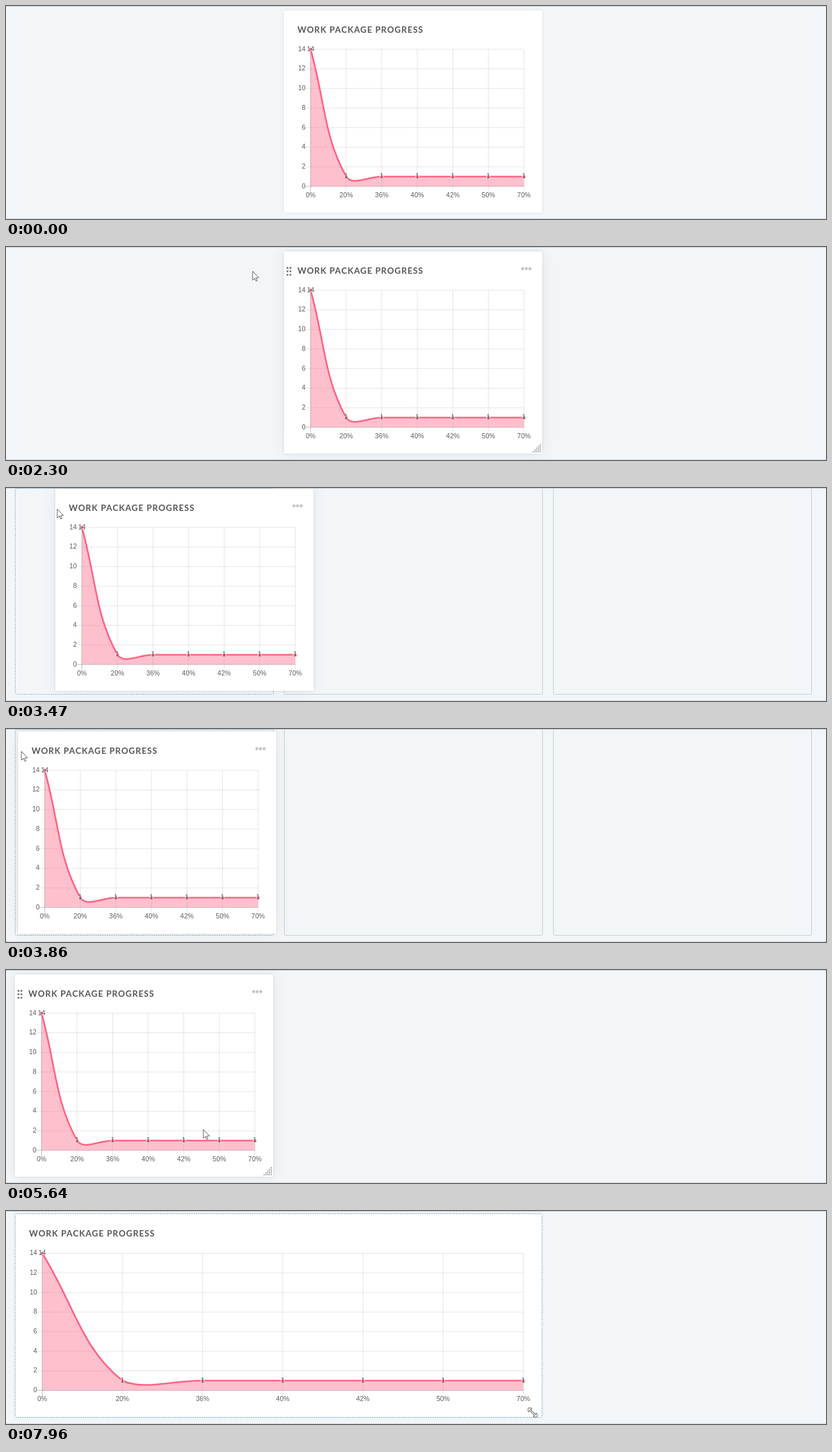
Write an HTML page with a canvas that moves like this. It is 1280 by 334 pixels and loops after 8000 ms.

```html
<!DOCTYPE html>
<html lang="en">
<head>
<meta charset="utf-8">
<title>Dashboard widget</title>
<style>
  html, body { margin: 0; width: 100%; height: 100%; overflow: hidden; background: #f2f6f9; }
  canvas { display: block; }
</style>
</head>
<body>
<canvas id="stage" width="1280" height="334"></canvas>
<script>
const ctx = document.getElementById('stage').getContext('2d');
const LOOP = 8000, STEP = 78;
const CARD_W = 403, CARD_H = 317, PITCH = 420, MARGIN = 14;
const PINK = '#ff6384';
const LABELS = ['0%', '20%', '36%', '40%', '42%', '50%', '70%'];
const VALUES = LABELS.map((_, i) => i ? 1 : 14);

const ENTER = 520, GRAB = 1440, LIFT = 2300, OVER_HANDLE = 4080;
const DROP = 4870, LEAVE = 5180, OVER_GRIP = 6180, RESIZE = 6890;

const linear = p => p;
const easeOut = p => 1 - (1 - p) ** 2;
const leg = (start, end, from, to, ease = linear) => ({ start, end, from, to, ease });

const POINTER = [
  leg(ENTER, GRAB, [655, 318], [440, 38]),
  leg(LIFT, 3080, [385, 38], [190, 46]),
  leg(3080, 3470, [190, 46], [80, 33]),
  leg(3470, OVER_HANDLE, [80, 33], [16, 35], easeOut),
  leg(LEAVE, 6130, [24, 68], [406, 313], easeOut),
  leg(RESIZE, 7680, [416, 315], [681, 306]),
  leg(7680, 7960, [681, 306], [822, 316])
];
const CARD = [
  leg(LIFT, 3080, [434, 7], [223, 19]),
  leg(3080, 3470, [223, 19], [77, 1]),
  leg(3470, OVER_HANDLE, [77, 1], [10, 4], easeOut),
  leg(DROP, LEAVE, [14, 7], [14, 7])
];

function along(legs, t) {
  const { start, end, from, to, ease } = legs.filter(l => l.start <= t).pop() || legs[0];
  const passed = t >= end - 8 ? end - start : Math.floor((t - start) / STEP + .1) * STEP;
  const p = ease(Math.min(1, Math.max(0, passed / (end - start))));
  return from.map((v, i) => Math.round(v + (to[i] - v) * p));
}

function line(x0, y0, x1, y1, color) {
  ctx.strokeStyle = color;
  ctx.lineWidth = 1;
  ctx.beginPath();
  ctx.moveTo(x0, y0);
  ctx.lineTo(x1, y1);
  ctx.stroke();
}

function dot(x, y, r, color) {
  ctx.fillStyle = color;
  ctx.beginPath();
  ctx.arc(x, y, r, 0, Math.PI * 2);
  ctx.fill();
}

function text(s, x, y, align) {
  ctx.font = '10.4px "Liberation Sans", Arial, sans-serif';
  ctx.textAlign = align;
  ctx.textBaseline = 'middle';
  ctx.fillStyle = '#5a5a5a';
  ctx.fillText(s, x, y);
}

function outline(x, y, w, h, color, dash = []) {
  ctx.setLineDash(dash);
  ctx.strokeStyle = color;
  ctx.lineWidth = 1;
  ctx.beginPath();
  ctx.roundRect(x + .5, y + .5, w - 1, h - 1, 2);
  ctx.stroke();
  ctx.setLineDash([]);
}

const dashed = (x, y, w, h) => outline(x, y, w, h, '#79a9c9', [1.75, 1.75]);

function shadow(alpha, blur) {
  ctx.shadowColor = `rgba(0,0,0,${alpha})`;
  ctx.shadowBlur = blur;
  ctx.fill();
}

function panel(x, y, w, h, raised) {
  ctx.save();
  ctx.fillStyle = '#fff';
  ctx.beginPath();
  ctx.roundRect(x, y, w, h, 2);
  if (raised) shadow(.06, 26);
  shadow(.1, 4);
  ctx.restore();
}

// Smooth line through the points, handles kept inside the plot.
function curve(pts, top, bottom) {
  const clamp = y => Math.min(bottom, Math.max(top, y));
  const handles = pts.map((p, i) => {
    const a = pts[i - 1] || p, b = pts[i + 1] || p;
    const da = Math.hypot(p[0] - a[0], p[1] - a[1]);
    const db = Math.hypot(b[0] - p[0], b[1] - p[1]);
    const ka = .4 * da / (da + db), kb = .4 * db / (da + db);
    const dx = b[0] - a[0], dy = b[1] - a[1];
    return [p[0] - ka * dx, clamp(p[1] - ka * dy), p[0] + kb * dx, clamp(p[1] + kb * dy)];
  });
  ctx.beginPath();
  ctx.moveTo(...pts[0]);
  for (let i = 1; i < pts.length; i++) {
    const h0 = handles[i - 1], h1 = handles[i];
    ctx.bezierCurveTo(h0[2], h0[3], h1[0], h1[1], ...pts[i]);
  }
}

function chart(x, y, w) {
  const left = x + 41.5, right = x + w - 28.5, top = y + 60.8, bottom = y + 275.8;
  const gap = (right - left) / (VALUES.length - 1);
  const yOf = v => bottom - v * (bottom - top) / 14;
  const shade = i => i ? 'rgba(0,0,0,.1)' : 'rgba(0,0,0,.25)';

  LABELS.forEach((label, i) => {
    const px = left + gap * i;
    line(px, top, px, bottom + 8, shade(i));
    text(label, px, y + 290, 'center');
  });
  for (let v = 0; v <= 14; v += 2) {
    line(left - 8, yOf(v), right, yOf(v), shade(v));
    text(v, left - 8, yOf(v), 'right');
  }

  const pts = VALUES.map((v, i) => [left + gap * i, yOf(v)]);
  curve(pts, top, bottom);
  ctx.lineTo(right, bottom);
  ctx.lineTo(left, bottom);
  ctx.fillStyle = 'rgba(255,99,132,.4)';
  ctx.fill();
  curve(pts, top, bottom);
  ctx.strokeStyle = PINK;
  ctx.lineWidth = 2.6;
  ctx.stroke();

  pts.forEach(([px, py], i) => {
    dot(px, py, 3, '#fff');
    dot(px, py, 2.2, PINK);
    text(VALUES[i], px, py, 'center');
  });
}

function content(x, y, w) {
  ctx.font = 'bold 13.2px Lato, sans-serif';
  ctx.letterSpacing = '1px';
  ctx.textAlign = 'left';
  ctx.textBaseline = 'alphabetic';
  ctx.fillStyle = '#555';
  ctx.fillText('WORK PACKAGE PROGRESS', x + 21, y + 34.5);
  ctx.letterSpacing = '0px';
  chart(x, y, w);
}

function menu(x, y) {
  for (let i = 0; i < 3; i++) dot(x + 372.6 + i * 5.6, y + 27, 2.4, '#c6c6c6');
}

function handles(x, y) {
  for (let i = 0; i < 6; i++) {
    dot(x + 5.4 + (i % 2) * 4.6, y + 25.7 + (i >> 1) * 5.4, 1.6, '#757a82');
  }
  ctx.fillStyle = '#808488';
  for (let row = 0; row < 5; row++) {
    for (let col = 0; col <= row; col++) {
      ctx.fillRect(x + 399.3 - col * 2.8, y + 302 + row * 2.8, 1.6, 1.6);
    }
  }
}

// White strokes with a dark rim.
function rimmed(path, width, rim) {
  ctx.lineCap = ctx.lineJoin = 'round';
  [['#333', width + rim], ['#fff', width]].forEach(([color, w]) => {
    ctx.strokeStyle = color;
    ctx.lineWidth = w;
    ctx.stroke(path);
  });
}

function arrow() {
  const path = new Path2D('M0 0V14L3.2 11L5.4 15.6L7.3 14.7L5.2 10.3L9.6 10.1Z');
  ctx.fillStyle = '#fff';
  ctx.fill(path);
  ctx.strokeStyle = '#4a4a4a';
  ctx.lineWidth = .9;
  ctx.stroke(path);
}

function hand() {
  const path = new Path2D('M-5 0L-2 5H3');
  for (let i = 0; i < 4; i++) {
    path.moveTo(-3.2 + i * 2.6, -4.5 + Math.abs(i - 1.3) * .8);
    path.lineTo(-2 + i * 1.8, 4);
  }
  rimmed(path, 2, 2);
}

function resizer() {
  const path = new Path2D('M-5.5 -5.5L5.5 5.5M-6 -2.5V-6H-2.5M6 2.5V6H2.5');
  rimmed(path, 1.5, 1.4);
}

function cursor(t, x, y) {
  const holding = (t >= GRAB && t < LIFT) || (t >= OVER_HANDLE && t < LEAVE);
  const shape = t >= OVER_GRIP ? resizer : holding ? hand : arrow;
  ctx.save();
  ctx.translate(x, y);
  shape();
  ctx.restore();
}

function placeholders() {
  dashed(MARGIN, 0, CARD_W + 1, 324);
  for (let i = 1; i < 3; i++) {
    outline(MARGIN + PITCH * i, 0, CARD_W + 1, 324, '#c8cdd1');
  }
}

function draw(t) {
  const [mx, my] = along(POINTER, t);

  ctx.fillStyle = '#f2f6f9';
  ctx.fillRect(0, 0, 1280, 334);
  line(0, .5, 1280, .5, '#c9ced3');
  line(0, 333.5, 1280, 333.5, '#d3d8dc');

  if (t >= RESIZE) {
    const w = mx > MARGIN + PITCH ? CARD_W + PITCH : CARD_W;
    panel(MARGIN, 4, w, 319, false);
    content(MARGIN + 1, 5.5, w - 2);
    dashed(MARGIN, 4, w, 320);
  } else {
    const [x, y] = along(CARD, t);
    const dragging = t >= LIFT + STEP - 8 && t < DROP;
    const hover = t >= ENTER;
    if (dragging) placeholders();
    panel(x, y, CARD_W, CARD_H, hover);
    content(x, y, CARD_W);
    if (hover) menu(x, y);
    if (hover && !dragging) handles(x, y);
  }

  if (t >= ENTER) cursor(t, mx, my);
}

function tick() {
  draw(performance.now() % LOOP);
  requestAnimationFrame(tick);
}
tick();
</script>
</body>
</html>
```
